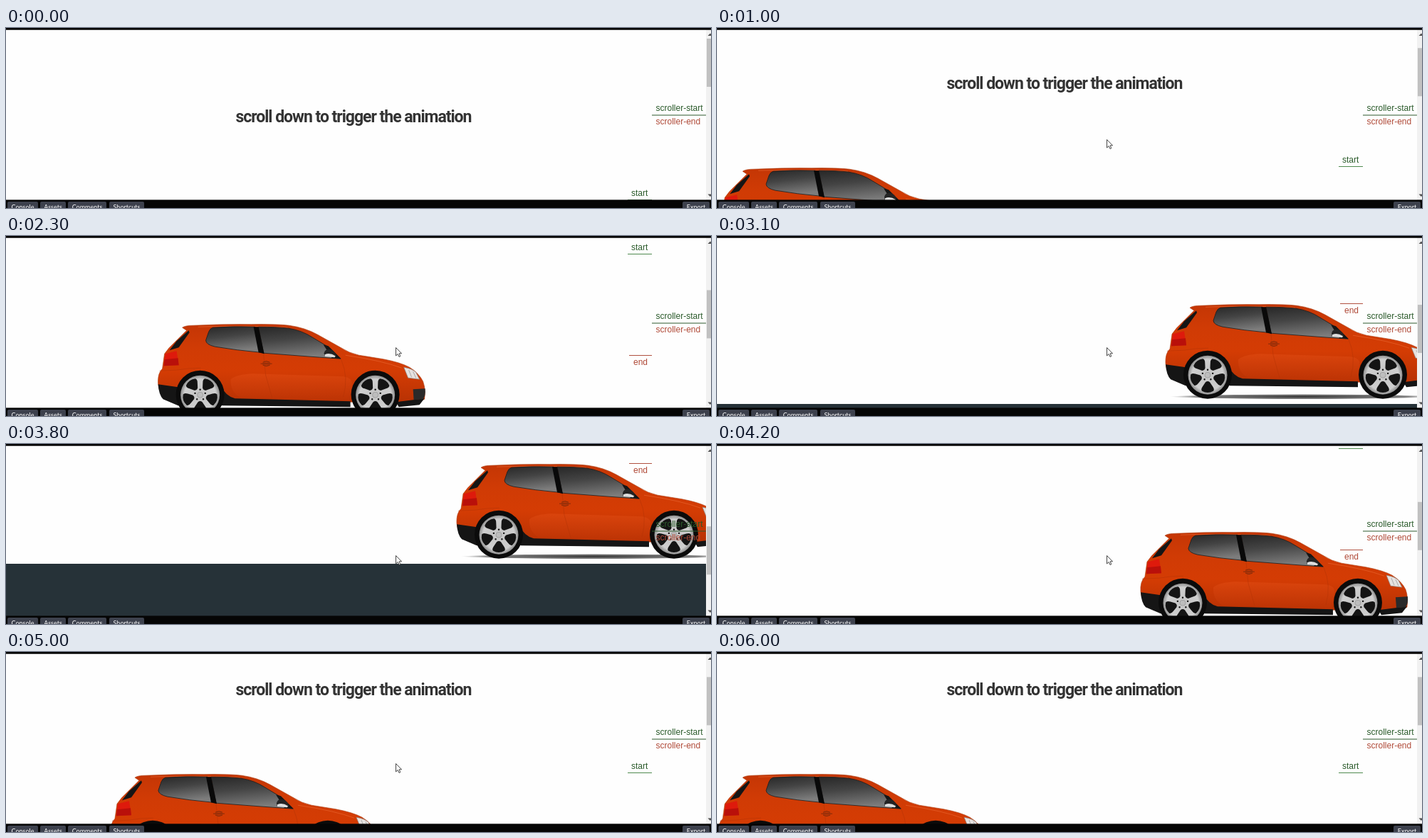
Write an HTML page that moves like this. It is 990 px wide and 254 px high and loops after 6.2 s.

```html
<!DOCTYPE html>
<html lang="en">
<head>
<meta charset="utf-8">
<title>Scroll-driven car</title>
<style>
  html, body { margin: 0; width: 100%; height: 100%; overflow: hidden; background: #fefefe; }
  svg { display: block; width: 100%; height: 100%; }
  text { font: 12px "Liberation Sans", Arial, sans-serif; }
  .title { font: 700 23px Roboto, sans-serif; letter-spacing: -1.02px; fill: #333; }
  .go { fill: #2a5a2a; }
  .stop { fill: #b04a38; }
  .button rect { fill: #3d414d; }
  .button text { font: 9px Lato, sans-serif; fill: #fff; }
</style>
</head>
<body>
<svg viewBox="0 0 990 254">
  <defs>
    <clipPath id="page"><rect y="2" width="983" height="241"/></clipPath>
    <linearGradient id="paint" x2="0" y2="1">
      <stop stop-color="#c43605"/>
      <stop offset=".3" stop-color="#d03b05"/>
      <stop offset=".6" stop-color="#d43c04"/>
      <stop offset="1" stop-color="#b83204"/>
    </linearGradient>
    <linearGradient id="panel" x2="0" y2="1">
      <stop stop-color="#df4a12"/>
      <stop offset="1" stop-color="#bf3405"/>
    </linearGradient>
    <linearGradient id="glass" x2=".25" y2="1">
      <stop stop-color="#272727"/>
      <stop offset=".45" stop-color="#444"/>
      <stop offset="1" stop-color="#7c7c7c"/>
    </linearGradient>
    <radialGradient id="rim">
      <stop stop-color="#c4c4c4"/>
      <stop offset=".8" stop-color="#cfcfcf"/>
      <stop offset="1" stop-color="#8e8e8e"/>
    </radialGradient>
    <radialGradient id="shade">
      <stop stop-color="#333"/>
      <stop offset=".8" stop-color="#555" stop-opacity=".75"/>
      <stop offset="1" stop-color="#888" stop-opacity="0"/>
    </radialGradient>
    <g id="wheel">
      <circle r="34" cy="-.5" fill="#0b0b0b"/>
      <circle r="27.500" fill="url(#rim)"/>
      <g id="holes" fill="#141414"></g>
      <circle r="4" fill="#bdbdbd" stroke="#8f8f8f" stroke-width=".6"/>
    </g>
  </defs>

  <rect width="990" height="254" fill="#fefefe"/>

  <g clip-path="url(#page)">
    <g id="content">
      <text class="title" x="322.500" y="132.500">scroll down to trigger the animation</text>
      <rect y="527" width="983" height="200" fill="#263238"/>
    </g>

    <g id="car">
      <ellipse cx="194" cy="130.500" rx="186" ry="3.600" fill="url(#shade)"/>
      <path fill="url(#paint)" stroke="#a83408" stroke-width=".6" d="M36 5Q40 2 52 2Q92 0 133 .5Q170 0 186 2Q208 5 226 15L258 33Q270 41 284 44L318 49.500Q342 54 355 61Q368 69 374 81Q378 92 376 106L368 110H20Q3 100 2 84 1 70 8 63L11 42Q17 33 26 25L42 9Z"/>
      <path fill="url(#panel)" d="M104 78Q112 71 135 70L262 74Q276 76 274 86L271 108 118 104Q103 96 104 78Z" opacity=".6"/>
      <path fill="none" stroke="#b23407" stroke-width=".7" opacity=".7" d="M150 42L153 72 162 104M259 50Q270 75 262 103M4 66L28 65Q44 62 62 62"/>
      <path fill="none" stroke="#ed6a34" opacity=".6" d="M58 4Q130 1.500 184 5M265 44Q318 52 344 62"/>
      <path fill="#151515" d="M2 85L30 89 40 114 30 115 9 106Q3 100 2 85ZM90 87Q97 102 110 105L272 109V117L92 115Q82 110 90 87ZM336 110L376 105 369 114 340 117Z"/>
      <path fill="#151515" d="M45 9L46 12 31 33 18 37 28 24Z"/>
      <path fill="#de1a0c" d="M12 42L28 38 31 58 10 59Z"/>
      <path fill="#b9100a" d="M11 50L30 48 31 58 10 59Z"/>
      <g stroke="#1c1c1c" stroke-width=".8" stroke-linejoin="round">
        <path fill="url(#glass)" d="M79 5Q108 3 138 4L145 40Q112 37 82 32 69 29 69 23L73 11Q75 6 79 5Z"/>
        <path fill="url(#glass)" d="M143 4Q168 4 185 6Q204 9 219 19L242 33 258 49 229 47 150 41Z"/>
      </g>
      <path fill="#090909" d="M136 4H143L151 42 143 40Z"/>
      <path fill="#161616" d="M234 29L241 31 259 49 246 48Z"/>
      <path fill="#242424" d="M235 41Q237 34 245 36 253 40 252 47L236 46Z"/>
      <path fill="#dedede" d="M236 43Q243 40 251 45L250 47 236 46Z"/>
      <ellipse cx="154" cy="56" rx="5.500" ry="3" fill="#b83607"/>
      <path fill="none" stroke="#6e270c" stroke-width=".8" d="M146 56H162M149 54Q154 51 159 54M149 58Q154 61 159 58"/>
      <path fill="#e6e2e0" stroke="#8d7d76" stroke-width=".7" d="M347 61Q359 63 364 68L369 78 353 76Z"/>
      <path fill="none" stroke="#aaa" d="M354 65L358 75M360 67L364 76"/>
      <path fill="#2a2a2a" d="M360 92L377 91Q378 101 374 106L361 107Z"/>
      <use href="#wheel" x="61" y="100"/>
      <use href="#wheel" x="307" y="100"/>
    </g>

    <g id="markers">
      <text class="go" x="878" y="237">start</text>
      <rect x="873" y="242" width="34" height="1" fill="#4f8a4f"/>
      <rect x="875" y="385" width="32" height="1" fill="#b0503f"/>
      <text class="stop" x="881" y="399">end</text>
    </g>
    <text class="go" x="912.500" y="117">scroller-start</text>
    <rect x="907" y="122.500" width="76" height="1" fill="#2f5a2f"/>
    <text class="stop" x="912.500" y="136">scroller-end</text>
  </g>

  <rect x="983" y="2" width="7" height="241" fill="#f1f1f1"/>
  <rect id="thumb" x="984" y="15" width="6" height="68" fill="#c1c1c1"/>
  <path fill="#505050" d="M985.500 11L989 7.500 992 11ZM985.500 234.500L989 238 992 234.500Z"/>

  <path id="cursor" fill="#fff" stroke="#333" stroke-width=".9" stroke-linejoin="round" d="M.5 .5V12L3.200 9.500 5 13.500 6.800 12.700 5.100 8.800H8.500Z"/>

  <rect width="990" height="2.700"/>
  <rect y="242.400" width="990" height="12" fill="#050505"/>
  <g id="bar"></g>
</svg>

<script>
const LOOP = 6200;
const MAX_X = 631;
const PIN_START = 120, PIN_LENGTH = 142;
const CAR_TOP = 244.2;
const NOTCH = 72.6;
const $ = id => document.getElementById(id);
const place = (id, x, y) => $(id).setAttribute("transform", `translate(${x} ${y})`);

// Monotone cubic interpolation through [time, value] points.
function track(points) {
  const slope = i => (points[i + 1][1] - points[i][1]) / (points[i + 1][0] - points[i][0]);
  const tangents = points.map((_, i) => {
    if (i === 0 || i === points.length - 1) return 0;
    const a = slope(i - 1), b = slope(i);
    return a * b > 0 ? 2 * a * b / (a + b) : 0;
  });
  return time => {
    const next = points.findIndex(p => p[0] > time);
    if (next < 0) return points[points.length - 1][1];
    if (next === 0) return points[0][1];
    const i = next - 1, [t0, v0] = points[i], [t1, v1] = points[next];
    const h = t1 - t0, u = (time - t0) / h, w = 1 - u;
    return v0 * (1 + 2 * u) * w * w + v1 * u * u * (3 - 2 * u)
      + h * u * w * (tangents[i] * w - tangents[next] * u);
  };
}

// Wheel notches: [start, end, notch reached]; the page ends before a full fifth notch.
const hops = [
  [850, 1100, 1], [1430, 1650, 2], [2020, 2220, 3], [2550, 2750, 4], [3200, 3420, 4.935],
  [3830, 4000, 4], [4080, 4260, 3], [4350, 4540, 2], [4780, 5000, 1]
];
const scrollAt = track(hops.flatMap(([from, to, n], i) =>
  [[from, i ? hops[i - 1][2] * NOTCH : 0], [to, n * NOTCH]]));

const carAt = track([
  [1580, 0], [1800, 17], [2100, 108], [2300, 211], [2600, 430], [2850, 570], [3100, 628],
  [3400, MAX_X], [4000, MAX_X], [4300, 560], [4600, 389], [4900, 190], [5300, 50], [5700, 8], [6000, 0]
]);
const cursorAt = track([[250, 0], [700, 1], [5200, 1], [5700, 0]]);

$("holes").innerHTML = [36, 108, 180, 252, 324].map(angle =>
  `<g transform="rotate(${angle})">
    <path d="M-8 -22.500Q0 -27 8 -22.500 10 -20 7 -16L3 -10Q0 -7.500 -3 -10L-7 -16Q-10 -20 -8 -22.500Z"/>
    <circle cy="7.500" r="1.200"/>
  </g>`).join("");

$("bar").innerHTML = [
  ["Console", 2, 43], ["Assets", 48, 36], ["Comments", 87, 54], ["Shortcuts", 145, 49], ["Export", 950, 38]
].map(([label, x, width]) =>
  `<g class="button"><rect x="${x}" y="245" width="${width}" height="14" rx="2"/>
  <text x="${x + width / 2}" y="256" text-anchor="middle">${label}</text></g>`).join("");

function draw(now) {
  const time = now % LOOP;
  const scroll = Math.floor(scrollAt(time));
  const pinned = Math.min(Math.max(scroll - PIN_START, 0), PIN_LENGTH);
  const shown = cursorAt(time);
  place("content", 0, -scroll);
  place("markers", 0, -scroll);
  place("car", carAt(time), CAR_TOP + pinned - scroll);
  place("thumb", 0, scroll * .283);
  place("cursor", 992 - 445 * shown, 250 - 93 * shown);
  $("cursor").style.display = shown > 0 ? "" : "none";
  requestAnimationFrame(draw);
}
draw(performance.now());
</script>
</body>
</html>
```
